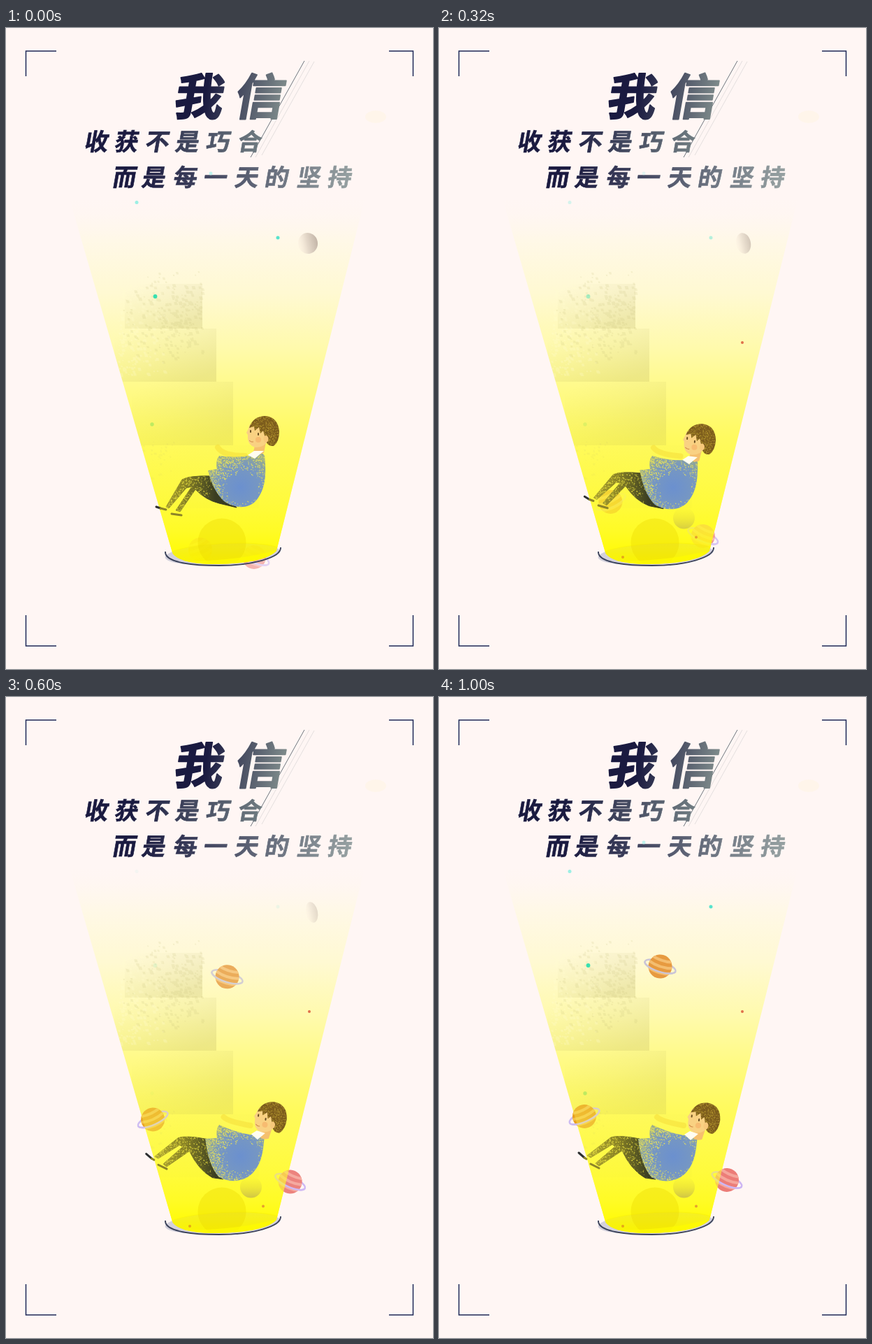
These frames come from a looping animation (611x917 px, 1.44 s). An HTML page:

```html
<!DOCTYPE html>
<html lang="zh">
<head>
<meta charset="utf-8">
<style>
html, body { margin: 0; width: 100%; height: 100%; overflow: hidden; background: #fff6f4; }
svg { display: block; width: 100vw; height: 100vh; }
text { font-family: "Noto Sans CJK SC", "Noto Sans CJK", sans-serif; font-weight: 700; text-anchor: middle; }
</style>
</head>
<body>
<svg viewBox="0 0 611 917" preserveAspectRatio="none">
  <defs>
    <linearGradient id="ink1" gradientUnits="userSpaceOnUse" x1="285" x2="405"><stop stop-color="#1a1a40"/><stop offset="1" stop-color="#84918f"/></linearGradient>
    <linearGradient id="ink2" gradientUnits="userSpaceOnUse" x1="180" x2="375"><stop stop-color="#1a1a40"/><stop offset="1" stop-color="#738084"/></linearGradient>
    <linearGradient id="ink3" gradientUnits="userSpaceOnUse" x1="190" x2="500"><stop stop-color="#1a1a40"/><stop offset="1" stop-color="#98a3a3"/></linearGradient>
    <linearGradient id="light" gradientUnits="userSpaceOnUse" x1="0" x2="0" y1="238" y2="760">
      <stop stop-color="#fff6f4" stop-opacity="0"/><stop offset=".12" stop-color="#fff8e8"/>
      <stop offset=".27" stop-color="#fff9d2"/><stop offset=".42" stop-color="#fffaac"/>
      <stop offset=".52" stop-color="#fffa8c"/><stop offset=".68" stop-color="#fffa5c"/>
      <stop offset=".86" stop-color="#fffb38"/><stop offset="1" stop-color="#fffb00"/>
    </linearGradient>
    <linearGradient id="veil" gradientUnits="userSpaceOnUse" x1="0" x2="0" y1="540" y2="760">
      <stop stop-color="#fffa68" stop-opacity="0"/><stop offset=".3" stop-color="#fffa58" stop-opacity=".35"/>
      <stop offset=".6" stop-color="#fffa40" stop-opacity=".55"/><stop offset=".82" stop-color="#fffb28" stop-opacity=".76"/>
      <stop offset="1" stop-color="#fffb00" stop-opacity=".96"/>
    </linearGradient>
    <linearGradient id="block" x1="0" y1="0" x2=".85" y2=".9">
      <stop offset=".1" stop-color="#a8a050" stop-opacity="0"/><stop offset=".5" stop-color="#a8a050" stop-opacity=".07"/><stop offset="1" stop-color="#a8a050" stop-opacity=".2"/>
    </linearGradient>
    <linearGradient id="moonFill"><stop stop-color="#fbeede" stop-opacity=".35"/><stop offset=".45" stop-color="#e6dacb"/><stop offset="1" stop-color="#c3b5a8"/></linearGradient>
    <linearGradient id="dropFill" x1="0" x2="0" y1="0" y2="1"><stop stop-color="#e0d840" stop-opacity="0"/><stop offset=".5" stop-color="#dcd240" stop-opacity=".5"/><stop offset="1" stop-color="#c4b84e" stop-opacity=".9"/></linearGradient>
    <linearGradient id="cloth" gradientUnits="userSpaceOnUse" x1="208" x2="300"><stop stop-color="#b3a932"/><stop offset=".5" stop-color="#8b8425"/><stop offset="1" stop-color="#3a3d22"/></linearGradient>
    <radialGradient id="knit" gradientUnits="userSpaceOnUse" cx="335" cy="657" r="50"><stop stop-color="#6b90cf"/><stop offset=".65" stop-color="#7898c0"/><stop offset="1" stop-color="#94a890"/></radialGradient>
    <clipPath id="beamClip"><path class="beam"/></clipPath>
    <clipPath id="ball"><circle r="17"/></clipPath>
    <clipPath id="knitClip"><path class="jumper"/></clipPath>
    <clipPath id="clothClip"><path class="trousers"/></clipPath>
    <clipPath id="hairClip"><path class="hair"/></clipPath>
  </defs>

  <rect width="611" height="917" fill="#fff6f4"/>
  <path d="M72 33H28.500V69M548 33H582.500V69M28.500 840V884H72M582.500 840V884H548" fill="none" stroke="#1f2a58" stroke-width="1.500"/>
  <ellipse cx="529" cy="127" rx="15" ry="9" fill="#fff5ea"/>
  <path d="M427 47L350 185" stroke="#6f7880"/>
  <path d="M434 47L357 185M441 48L366 182" stroke="#dcd8d8" stroke-width=".8"/>

  <path class="beam" fill="url(#light)"/>
  <g clip-path="url(#beamClip)">
    <g fill="url(#block)">
      <rect x="170" y="366" width="111" height="64"/><rect x="155" y="430" width="146" height="76"/>
      <rect x="180" y="506" width="145" height="91"/><rect x="200" y="597" width="162" height="90" opacity=".3"/>
    </g>
    <path id="dust" fill="#b8b26a" opacity=".14"/>
    <path id="fleck" fill="#fffbd0" opacity=".25"/>
  </g>

  <ellipse cx="310" cy="753" rx="82.500" ry="15" transform="rotate(-3 310 753)" fill="#d3d0dc"/>
  <g id="amber"></g>
  <g id="rose"></g>
  <path class="beam" fill="url(#veil)"/>
  <g clip-path="url(#beamClip)">
    <ellipse cx="311" cy="752" rx="84" ry="15" transform="rotate(-3 311 752)" fill="#eee000" opacity=".28"/>
    <circle cx="309" cy="736" r="34.500" fill="#e9d800" opacity=".38"/>
    <path d="M232 760Q310 768 392 746V775H232Z" fill="#fffc00" opacity=".7"/>
  </g>
  <path d="M228 749C227 764 262 769 305 769C352 769 394 758 393 743" fill="none" stroke="#3d445c" stroke-width="1.900"/>

  <g id="late" fill="#e0704a">
    <circle cx="434" cy="450" r="2"/><circle cx="263" cy="757" r="2" fill="#e5a818"/><circle cx="368" cy="728.500" r="2" fill="#e5a030"/>
  </g>
  <circle id="drop" cx="350.500" cy="701" r="15.500" fill="url(#dropFill)"/>

  <g id="boy">
    <path id="shoes" fill="none" stroke="#2c2e30" stroke-width="3" stroke-linecap="round"/>
    <path id="shoes2" fill="none" stroke="#8d8428" stroke-width="3" stroke-linecap="round"/>
    <path class="trousers" fill="url(#cloth)" stroke="url(#cloth)" stroke-linejoin="round"/>
    <path id="clothGrain" clip-path="url(#clothClip)" fill="#eee540" opacity=".75"/>
    <path id="arm" fill="none" stroke="#f5dc36" stroke-width="8" stroke-linecap="round" opacity=".5"/>
    <path class="jumper" fill="url(#knit)"/>
    <path id="knitGrain" clip-path="url(#knitClip)" fill="#ece458" opacity=".85"/>
    <g id="head">
      <path d="M357 594L372 592L369 608Q360 612 354 606Z" fill="#f5c06e"/>
      <path d="M349 567Q347 574 344 579L346 582Q345 597 357 600Q371 600 376 588L374 568Z" fill="#f9d182"/>
      <path class="hair" fill="#7c5c1c"/>
      <path id="hairGrain" clip-path="url(#hairClip)" fill="#b99c30" opacity=".8"/>
      <ellipse cx="372" cy="588" rx="3.500" ry="5" fill="#f7c87a"/>
      <circle cx="361" cy="589" r="4" fill="#f5a860" opacity=".5"/>
      <path d="M350 576v2M361 580v2" stroke="#6a4f22" stroke-width="2" stroke-linecap="round"/>
      <path d="M348 590q3 3 6 2" fill="none" stroke="#d08a48"/>
    </g>
    <path id="collar" fill="#fffdf0"/>
  </g>

  <g id="saturn"></g>
  <ellipse id="moon" cy="308" ry="15" fill="url(#moonFill)"/>

  <g stroke-linejoin="round">
    <text transform="translate(-5 124) skewX(-10)" font-size="70" x="278 365" fill="url(#ink1)" stroke="url(#ink1)" stroke-width="2">我信</text>
    <text transform="translate(-3 175) skewX(-10)" font-size="34" x="131 174 218 261 305 350" fill="url(#ink2)" stroke="url(#ink2)" stroke-width=".6">收获不是巧合</text>
    <text transform="translate(-3 226) skewX(-10)" font-size="34" x="171 213 258 301 346 389 435 479" fill="url(#ink3)" stroke="url(#ink3)" stroke-width=".6">而是每一天的坚持</text>
  </g>
  <g id="sparks">
    <circle cx="187" cy="249.500" r="2.500" fill="#9cefe4"/><circle cx="389" cy="300" r="2.500" fill="#58e3cd"/>
    <circle cx="213.500" cy="384" r="2.900" fill="#38e0b0"/><circle cx="209" cy="567" r="2.700" fill="#bdea60"/>
    <circle cx="293" cy="208" r="2.500" fill="#c2f3ee"/>
  </g>
</svg>
<script>
const $ = id => document.getElementById(id);
const setAll = (cls, d) => document.querySelectorAll('.' + cls).forEach(e => e.setAttribute('d', d));
const set = (id, attrs) => { for (const k in attrs) $(id).setAttribute(k, attrs[k]); };

setAll('beam', 'M89 238L238.5 752Q250 767 300 767Q370 766 387 748L515 238Z');
setAll('hair', 'M348 572Q353 556 370 555Q389 556 391 577Q391 592 383 598Q374 599 372 590L368 576L364 580L362 571L356 576L355 570Z');

let seed = 7;
const random = () => (seed = seed * 16807 % 2147483647) / 2147483647;

// Scatters small squares in a box; density(x, y) is the chance to keep one.
function grain(count, x, y, w, h, size, density) {
  let d = '';
  for (let i = 0; i < count; i++) {
    const px = x + random() * w, py = y + random() * h, s = size * (.5 + random());
    if (random() < density(px, py))
      d += `M${px.toFixed(1)} ${py.toFixed(1)}h${s.toFixed(1)}l${(s * .3).toFixed(1)} ${s.toFixed(1)}h${(-s).toFixed(1)}z`;
  }
  return d;
}
const cloud = (x, y) => Math.max(0, 1 - Math.hypot((x - 240) / 85, (y - 410) / 75));
set('dust', { d: grain(900, 158, 336, 122, 165, 3.2, cloud) + grain(90, 190, 590, 50, 55, 2, () => .5) });
set('fleck', { d: grain(420, 160, 366, 80, 130, 3, (x, y) => (240 - x) / 80) });
set('knitGrain', { d: grain(5500, 284, 604, 90, 92, 1, (x, y) => {
  const far = Math.hypot((x - 336) / 44, (y - 658) / 42);
  return Math.max(0, far - .45) * (x < 335 || y > 672 ? 1.2 : .6);
}) });
set('clothGrain', { d: grain(4200, 200, 622, 108, 74, 1, x => Math.max(.03, (302 - x) / 110)) });
set('hairGrain', { d: grain(800, 346, 554, 46, 46, 1, () => .7) });

function planet(id, body, stripe, ring, tilt) {
  $(id).innerHTML = `<g transform="rotate(${tilt})">
    <ellipse class="ring" rx="23" ry="7.500" fill="none" stroke="${ring}" stroke-width="2.500"/>
    <circle r="17" fill="${body}"/>
    <g clip-path="url(#ball)" fill="none" stroke="${stripe}" stroke-width="4">
      <path d="M-18 -12Q0 -6 18 -12M-18 -3Q0 3 18 -3M-18 6Q0 12 18 6"/></g>
    <path class="ring" d="M-23 0A23 7.500 0 0 0 23 0" fill="none" stroke="${ring}" stroke-width="2.500"/></g>`;
}
planet('amber', '#e8a01f', '#f3c04a', '#cdbcf2', -24);
planet('rose', '#ec7d78', '#f5a69c', '#cdb6f3', 24);
planet('saturn', '#e79a40', '#f4bd70', '#cbc5d6', 18);

const mix = (a, b, k) => a + (b - a) * k;
const ease = (t, end, start = 0) => {
  const u = Math.max(0, Math.min(1, (t - start) / (end - start)));
  return u * u * (3 - 2 * u);
};

// Piecewise linear value through [time, value] pairs.
function track(t, keys) {
  if (t <= keys[0][0]) return keys[0][1];
  for (let i = 1; i < keys.length; i++) {
    const [t0, a] = keys[i - 1], [t1, b] = keys[i];
    if (t <= t1) return mix(a, b, (t - t0) / (t1 - t0));
  }
  return keys[keys.length - 1][1];
}

// Blends two paths that share the same commands.
function morph([a, b], k) {
  const end = b.match(/[\d.]+/g);
  let i = 0;
  return a.replace(/[\d.]+/g, n => mix(+n, +end[i++], k).toFixed(2));
}
const pose = {
  jumper: ['M352 611Q366 604 370 612C373 640 371 660 358 676C345 690 325 686 312 677Q296 662 289 633L302 631Q299 620 305 612Q330 616 352 611Z',
           'M350 627Q366 624 370 626C368 650 366 668 352 682C338 695 318 695 304 687Q289 670 285 632L302 631Q300 618 305 612Q330 624 350 627Z'],
  trousers: ['M294 641Q262 640 252 646L229 685L233 687L258 658L266 656L243 690L249 692L271 660Q285 675 305 680L330 686Z',
             'M287 632Q256 626 246 630L212 656L217 659L248 640L252 643L224 667L229 671L262 649Q275 677 295 688L310 690Z'],
  arm: ['M303 600Q310 612 342 612', 'M312 601Q318 607 350 613'],
  collar: ['M346 611L355 605L369 605L356 616Z', 'M351 626L359 621L371 625L360 634Z'],
  shoes: ['M215 685L221 687', 'M200 652L208 659'],
  shoes2: ['M221 687L229 689M237 695L251 697', 'M208 659L211 661M217 668L229 674']
};

function draw(t) {
  const k = ease(t, 690);
  setAll('jumper', morph(pose.jumper, k));
  setAll('trousers', morph(pose.trousers, k));
  for (const id of ['arm', 'collar', 'shoes', 'shoes2']) set(id, { d: morph(pose[id], k) });
  set('head', { transform: `translate(${11.5 * k} ${25.5 * k}) rotate(${8 * k} 371 577)` });

  const a = ease(t, 670);
  set('amber', { transform: `translate(${mix(278, 208, a)} ${mix(746, 600, a)})`, opacity: track(t, [[0, .75], [680, 1]]) });
  const ring = track(t, [[280, 0], [520, 1]]);
  $('amber').querySelectorAll('.ring').forEach(e => e.setAttribute('opacity', ring));
  set('rose', { transform: `translate(${mix(355, 412, ease(t, 740))} ${mix(757, 691, ease(t, 680))})`, opacity: track(t, [[0, .55], [680, 1]]) });
  const s = ease(t, 680, 400);
  set('saturn', { transform: `translate(316.500 ${mix(460, 385.5, s)})`, opacity: s });

  const half = track(t, [[0, 14], [160, 12], [400, 9.5], [680, 8], [840, 7]]);
  set('moon', { cx: 446 - half, rx: half, transform: `rotate(-12 ${446 - half} 308)`, opacity: track(t, [[0, 1], [320, .72], [520, .55], [680, .38], [840, 0]]) });
  set('sparks', { opacity: track(t, [[0, 1], [160, .75], [520, .04], [560, .04], [680, .25], [1000, 1]]) });
  set('late', { opacity: track(t, [[0, 0], [160, .55], [320, 1]]) });
  set('drop', { opacity: track(t, [[0, 0], [160, .45], [400, .9]]) });
}

function frame() {
  const t = performance.now() % 1440;
  draw(Math.min(1000, Math.floor(t / 40) * 40));
  requestAnimationFrame(frame);
}
frame();
</script>
</body>
</html>
```
